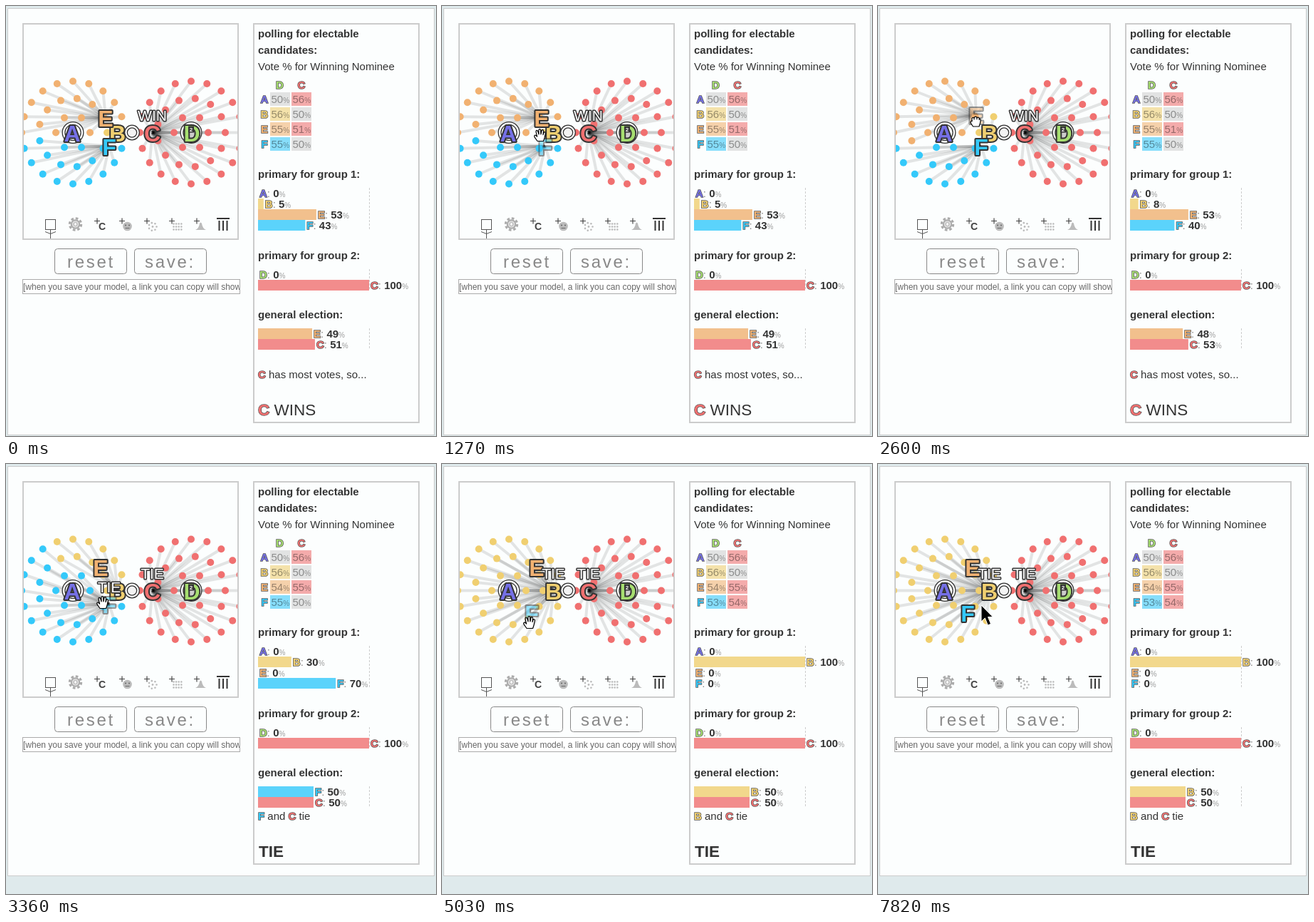
Animation of 604x603 px, one loop 8000 ms. Source, as an HTML page:

```html
<!DOCTYPE html>
<html lang="en">
<head>
<meta charset="utf-8">
<title>Primary election model</title>
<style>
html, body { margin: 0; width: 100%; height: 100%; overflow: hidden; background: #dfeaec; }
svg { display: block; width: 604px; height: 603px; font: 15px "Liberation Sans", Arial, sans-serif; fill: #333; }
.b { font-weight: bold; }
.key { font-weight: bold; stroke: #555; stroke-width: 1.5px; paint-order: stroke; }
.pct { font-size: 10px; font-weight: normal; fill: #999; }
.thin { fill: #888; font-weight: normal; }
.cand { font-size: 32px; font-weight: bold; text-anchor: middle; stroke: #333; stroke-width: 4px; paint-order: stroke; stroke-linejoin: round; }
.flag { font-size: 21px; text-anchor: middle; fill: #fff; stroke: #333; stroke-width: 3px; paint-order: stroke; stroke-linejoin: round; }
.btn { font-size: 24px; letter-spacing: 2.7px; fill: #888; }
.cell { fill: #000; opacity: .38; }
.mid { text-anchor: middle; }
</style>
</head>
<body>
<svg viewBox="0 0 604 603">
  <defs><clipPath id="arena"><rect x="25" y="26" width="300" height="300"/></clipPath>
  <clipPath id="field"><rect x="24" y="384" width="304" height="20"/></clipPath></defs>
  <g id="page"></g>
  <g id="tools"></g>
  <g id="model" clip-path="url(#arena)"></g>
  <g id="report"></g>
  <g id="cursor"></g>
</svg>
<script>
const LOOP = 8000, FULL = 156, LEFT = 354;
const colors = { A: '#7570e6', B: '#f0cf70', C: '#f07070', D: '#a6de70', E: '#f1b171', F: '#34c9fa' };
const home = { A: [93, 177.5], B: [156.5, 177.5], C: [205.5, 177.5], D: [261, 177.5], E: [140, 156.5], F: [145, 196.5] };
const groups = [[94, 177.5], [260, 177.5]];

// start time, pointer, x, y, hovered candidate
const steps = [
  [0, '', 0, 0], [370, 'arrow', 86, 518], [520, 'arrow', 129, 437], [640, 'arrow', 142, 390],
  [760, 'arrow', 150, 330], [880, 'arrow', 157, 270], [1000, 'arrow', 148, 215],
  [1120, 'open', 131, 180, 'F'], [1270, 'open', 129, 172, 'F'], [1420, 'open', 129, 169, 'F'],
  [1540, 'open', 130, 164, 'E'], [1660, 'open', 130, 160, 'E'], [1780, 'open', 130, 157, 'E'],
  [2210, 'shut', 130, 157, 'E'], [2480, 'shut', 130.5, 157.5, 'E'], [2600, 'shut', 129, 154, 'E'],
  [2720, 'shut', 127, 150, 'E'], [2840, 'shut', 124, 147, 'E'], [3240, 'open', 125, 166],
  [3360, 'open', 127, 185, 'F'], [3480, 'open', 130, 194, 'F'], [3600, 'open', 131, 200, 'F'],
  [3850, 'shut', 130, 206, 'F'], [3970, 'shut', 126, 207, 'F'], [4090, 'shut', 122, 210, 'F'],
  [4210, 'shut', 118, 213, 'F'], [4330, 'shut', 114, 216, 'F'], [5030, 'open', 114, 213, 'F'],
  [5620, 'open', 122, 210, 'F'], [5740, 'arrow', 140, 202], [5860, 'arrow', 153, 195],
  [5980, 'open', 138, 185, 'B'], [6130, 'open', 142, 181, 'B'], [7670, 'open', 140, 183, 'B'],
  [7820, 'arrow', 145, 198]
];
const drags = {
  E: [[2600, 138, 153], [2720, 135, 149], [2840, 133, 145]],
  F: [[3850, 143, 197.5], [3970, 140, 199.5], [4090, 136, 203], [4210, 131, 207], [4330, 126, 209]]
};

const $ = id => document.getElementById(id);
const rect = (x, y, w, h, attrs) => `<rect x="${x}" y="${y}" width="${w}" height="${h}" ${attrs}/>`;
const text = (x, y, s, cls = '') => `<text x="${x}" y="${y}" class="${cls}">${s}</text>`;
const path = (d, attrs) => `<path d="${d}" ${attrs}/>`;
const dot = (x, y, r, attrs) => `<circle cx="${x}" cy="${y}" r="${r}" ${attrs}/>`;
const key = (k, size = 15) => `<tspan class="key" fill="${colors[k]}" font-size="${size}">${k}</tspan>`;
const pct = n => `${n}<tspan class="pct">%</tspan>`;

// a centre point and rings of 6, 13 and 20 voters
const ring = (n, r) => Array.from({ length: n }, (_, i) => {
  const a = 2 * Math.PI * i / n;
  return [r * Math.cos(a), r * Math.sin(a)];
});
const crowd = [[0, 0], ...ring(6, 24), ...ring(13, 48), ...ring(20, 72)];
const voters = groups.map(([cx, cy]) => crowd.map(([x, y]) => [cx + x, cy + y]));

function positions(t) {
  const pos = { ...home };
  for (const k in drags) for (const [at, x, y] of drags[k]) if (t >= at) pos[k] = [x, y];
  return pos;
}

function nearest([x, y], names, pos) {
  const dist = k => Math.hypot(x - pos[k][0], y - pos[k][1] + (k === 'F' ? 2.5 : 0));
  return names.reduce((a, b) => dist(b) < dist(a) ? b : a);
}

const share = (votes, k) => votes.filter(v => v === k).length / votes.length * 100;

function drawTools() {
  const plus = x => path(`M${x - 4} 301.5h8M${x} 297.5v8`, 'stroke="#444" stroke-width="1.2"');
  const grey = 'fill="#bbb"';
  let s = rect(55.5, 299.5, 14, 14, 'fill="none" stroke="#555"')
    + path('M62.5 314V326M55 316.5L62.5 319.5L70 316.5', 'fill="none" stroke="#555"')
    + dot(97.5, 306, 8.2, 'fill="none" stroke="#aaa" stroke-width="3" stroke-dasharray="3.6 2.84"')
    + dot(97.5, 306, 5.8, 'fill="#ddd" stroke="#aaa" stroke-width="2"')
    + dot(97.5, 306, 2.4, 'fill="#fff" stroke="#aaa"');
  for (const x of [128, 163, 198, 233, 268]) s += plus(x);
  s += `<text x="130" y="314" class="b" font-size="14" fill="#444">C</text>`;
  s += dot(170.5, 309, 6.3, grey) + dot(168, 307.5, 1, 'fill="#666"') + dot(173, 307.5, 1, 'fill="#666"')
    + path('M167.5 311.5h6', 'stroke="#666"');
  s += dot(206, 309.5, 1.4, grey);
  for (const [x, y] of ring(7, 5.5)) s += dot(206 + x, 309.5 + y, 1.3, grey);
  for (let i = 0; i < 12; i++) s += dot(235.5 + i % 4 * 3.6, 305.5 + (i / 4 | 0) * 4, 1.3, grey);
  s += path('M266 314Q271 312 272 305Q273.500 302 275 305Q276 312 281 314Z', grey);
  s += path('M296 298H314M299.500 301V315M305 301V315M310.500 301V315', 'stroke="#333" stroke-width="2"');
  for (const x of [68.5, 180.5]) s += rect(x, 340.5, 101, 35, 'rx="4" fill="none" stroke="#888"');
  s += text(86, 367, 'reset', 'btn') + text(195, 367, 'save:', 'btn');
  s += rect(23.5, 383.5, 305, 20, 'fill="#fff" stroke="#aaa"');
  s += '<g clip-path="url(#field)" font-size="12" fill="#666">'
    + text(24, 398, '[when you save your model, a link you can copy will show') + '</g>';
  $('tools').innerHTML = s;
}

function drawPage(tie) {
  $('page').innerHTML = rect(2.5, 3.5, 599, tie ? 574 : 598, 'fill="#fcfefe" stroke="#ccc"')
    + rect(24, 25, 302, 302, 'fill="#fcfefe" stroke="#ccc" stroke-width="2"')
    + rect(348, 25, 232, tie ? 536 : 559, 'fill="none" stroke="#ccc" stroke-width="2"');
}

function drawModel(pos, ballots, hover, flags) {
  let lines = '', dots = '', names = '', marks = '';
  voters.forEach((g, i) => g.forEach(([x, y], j) => {
    const k = ballots[i][j];
    lines += path(`M${x} ${y}L${pos[k]}`, 'stroke="#000" stroke-opacity=".1" stroke-width="4"');
    dots += dot(x, y, 5, `fill="${colors[k]}"`);
  }));
  const hoop = (x, r, fill) => dot(x, 177.5, r, `fill="${fill}" stroke="#333" stroke-width="5"`)
    + dot(x, 177.5, r, 'fill="none" stroke="#fff" stroke-width="2.4"');
  marks = hoop(94, 13, '#fcfefe') + hoop(177, 8.5, '#f4f4f4') + hoop(260, 13, '#ccc');
  for (const k in pos) {
    const [x, y] = pos[k];
    const fade = k === hover ? .5 : 1;
    names += `<g opacity="${fade}" fill="${colors[k]}">${text(x, y + 12, k, 'cand')}</g>`;
  }
  names += rect(256, 168.5, 8, 9, 'fill="#333"')
    + '<text x="260" y="176" class="b mid" font-size="8" fill="#fff">2</text>';
  for (const k in flags) names += text(pos[k][0], pos[k][1] - 17, flags[k], 'flag');
  $('model').innerHTML = lines + dots + marks + names;
}

function bars(top, rows) {
  const h = rows.length * 15;
  let s = path(`M510.500 ${top}v${h}`, 'stroke="#ccc" stroke-dasharray="3 2"');
  rows.forEach(([k, v], i) => {
    const y = top + i * 15, w = v / 100 * FULL;
    s += rect(LEFT, y, w, 15, `fill="${colors[k]}" opacity=".8"`)
      + text(LEFT + w + 2, y + 13, `${key(k)}<tspan class="thin">: </tspan>${pct(Math.round(v))}`, 'b');
  });
  return s;
}

function drawReport(t, first, finals, tie) {
  let s = text(LEFT, 44, 'polling for electable', 'b') + text(LEFT, 67, 'candidates:', 'b')
    + text(LEFT, 90, 'Vote % for Winning Nominee')
    + text(384.5, 116, key('D'), 'mid') + text(415, 116, key('C'), 'mid');
  const polls = {
    A: [50, 56], B: [56, 50],
    E: t < 2720 ? [55, 51] : [54, 55],
    F: t < 4090 ? [55, 50] : [53, 54]
  };
  Object.keys(polls).forEach((k, row) => {
    const y = 121 + row * 21;
    s += text(363, y + 15, key(k), 'mid');
    polls[k].forEach((n, col) => {
      const x = 371 + col * 30, fill = n === 50 ? '#d0d0d0' : colors[col ? 'C' : k];
      s += rect(x, y, 28, 19, `fill="${fill}" opacity=".58"`)
        + `<text x="${x + 1.5}" y="${y + 14.5}" class="cell">${n}<tspan font-size="10">%</tspan></text>`;
    });
  });
  s += text(LEFT, 241, 'primary for group 1:', 'b') + bars(255, [...'ABEF'].map(k => [k, share(first, k)]));
  s += text(LEFT, 355, 'primary for group 2:', 'b') + bars(369, [['D', 0], ['C', 100]]);
  s += text(LEFT, 438, 'general election:', 'b') + bars(452, finals);
  if (tie) s += text(LEFT, 499, `${key(finals[0][0])} and ${key('C')} tie`)
    + `<text x="355" y="551" class="b" font-size="22.5">TIE</text>`;
  else s += text(LEFT, 522, `${key('C')} has most votes, so...`)
    + `<text x="${LEFT}" y="574" font-size="22.5">${key('C', 22.5)} WINS</text>`;
  $('report').innerHTML = s;
}

const pointers = {
  '': '',
  arrow: path('M0 0V23L5.300 18L9.300 28L13.500 26.300L9.500 16.600H16.300Z', 'fill="#000" stroke="#fff" stroke-width="1"'),
  open: path('M5 17.500L1.200 12.200Q.2 10 1.400 9.300Q2.800 8.800 4 10.600L4.600 11.200L3 4.300Q2.800 2.600 4.100 2.400'
    + 'Q5.300 2.400 5.700 3.800L7 8L6.900 2Q7 .6 8.200 .6Q9.400 .6 9.600 2L9.900 8L11 2.700Q11.400 1.400 12.500 1.700'
    + 'Q13.600 2 13.500 3.400L13 8.600L14 5.600Q14.600 4.400 15.600 4.800Q16.600 5.200 16.400 6.600L15 13L13.600 17.500Z',
    'fill="#fff" stroke="#000" stroke-width="1.2" stroke-linejoin="round"'),
  shut: path('M4.500 15L1.500 10.500Q.5 8 2.500 7L3.200 7.500Q2.200 2.900 4.200 2.500Q5.600 2.300 6 3.300Q6.400 1.200 8 1.200'
    + 'Q9.600 1.200 9.900 2.800Q11 1.600 12.400 2.400Q13.200 3 13.200 4.200Q15.200 3.800 15.200 5.800Q15 10 13 15Z'
    + 'M6 3.300V5.500M9.900 2.800V5.300M13.200 4.200V6',
    'fill="#fff" stroke="#000" stroke-width="1.2" stroke-linejoin="round"')
};

function draw([t, pointer, px, py, hover]) {
  const pos = positions(t);
  const viable = t < 2720 ? ['B', 'E', 'F'] : t < 4090 ? ['B', 'F'] : ['B'];
  const ballots = [voters[0].map(v => nearest(v, viable, pos)), voters[1].map(() => 'C')];
  const nominee = viable.reduce((a, b) => share(ballots[0], b) > share(ballots[0], a) ? b : a);
  const general = voters.flat().map(v => nearest(v, [nominee, 'C'], pos));
  const finals = [nominee, 'C'].map(k => [k, share(general, k)]);
  const tie = finals[0][1] === finals[1][1];
  drawPage(tie);
  drawModel(pos, ballots, hover, tie ? { [nominee]: 'TIE', C: 'TIE' } : { C: 'WIN' });
  drawReport(t, ballots[0], finals, tie);
  $('cursor').innerHTML = `<g transform="translate(${px} ${py})">${pointers[pointer]}</g>`;
}

let shown;
function tick() {
  const t = performance.now() % LOOP;
  const step = steps.filter(s => s[0] <= t).pop();
  if (step !== shown) draw(shown = step);
  requestAnimationFrame(tick);
}
drawTools();
tick();
</script>
</body>
</html>
```
